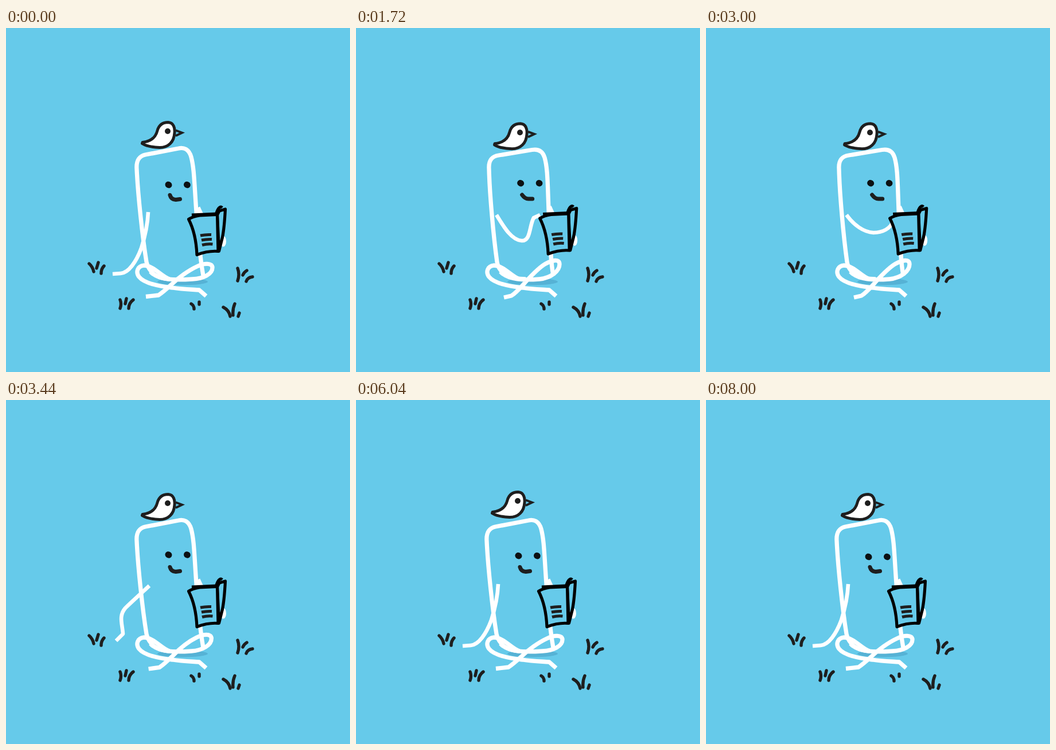
An HTML page that plays this animation: 600x600 px, repeating every 8.04 s.

```html
<!DOCTYPE html>
<html lang="en">
<head>
<meta charset="utf-8">
<title>Reading in the grass</title>
<style>
  html, body { margin: 0; width: 100%; height: 100%; overflow: hidden; background: #66caea; }
  svg { display: block; width: 100%; height: 100%; }
  path { fill: none; }
  .white { stroke: #fff; stroke-width: 7.3; stroke-linejoin: round; }
  .ink { stroke: #1e1e1e; stroke-width: 5; stroke-linecap: round; stroke-linejoin: round; }
  .book { stroke: #000; stroke-width: 5.2; stroke-linejoin: round; }
  .paper { fill: #66caea; }
</style>
</head>
<body>
<svg viewBox="0 0 600 600">
  <ellipse cx="308" cy="442.5" rx="44" ry="6" fill="#56b2d5"/>
  <path class="ink" style="stroke-width:5.4" d="M145,411 Q151,416 153,425 M161,409 L158,419 M171,415 Q166,420 166,428
    M199,474 Q202,481 199,489 M210,472 L208,481 M222,474 Q214,480 214,489
    M323,481 Q328,484 328,490 M337,478 L337,482
    M379,487 Q389,492 391,503 M399,481 Q395,490 396,501 M407,497 L405,503
    M404,419 Q408,430 404,441 M420,423 Q415,426 413,431 M430,434 Q421,435 419,442"/>

  <path id="body" class="white"/>
  <path class="white" d="M285,438 C272,434 258,415 241,414 C229,415 226,426 232,434 C240,444 262,450 290,453 C310,456 325,456 337,457 L349,467.5"/>
  <path id="leg" class="white"/>
  <path id="arm" class="white" style="stroke-width:6.6"/>

  <g id="book">
    <path class="white" d="M335,313 L341,326"/>
    <ellipse cx="379" cy="372" rx="5" ry="9.5" fill="#fff"/>
    <path class="book paper" d="M368.5,326 L372,319 L382.5,316 C381.5,335 380.5,350 377.5,365 L371.5,389 Z"/>
    <path class="book" d="M367,323 C370,313.5 374,310.5 377,313.5"/>
    <path class="book paper" d="M318.5,333.5 C324,330 330,328 338,327 L368.5,325.5 L370,389.5 C358,388.5 345,391 333,395.5 C332,372 327,350 318.5,333.5 Z"/>
    <path class="book" d="M324,326 L368,324"/>
    <path class="ink" style="stroke-linecap:butt" d="M339,362 Q348,360 358,360.5 M341,370 Q350,368 359,368.5 M342,378.5 Q351,376 360.5,377"/>
    <path id="page" class="book paper" d="M318.5,333.5 C324,330 330,328 338,327 L368.5,325.5 L370,389.5 C358,388.5 345,391 333,395.5 C332,372 327,350 318.5,333.5 Z"/>
  </g>

  <path id="eyes" d="M283,273.2 L284,273.8 M315.5,273.3 L316.3,273.7" stroke="#0c1012" stroke-width="11" stroke-linecap="round"/>
  <path id="smile" class="ink" style="stroke-width:7"/>

  <g id="bird">
    <path class="ink" style="fill:#fff" d="M238,199.5 C252,198 261,191 264,179 C267,168 275,164.5 283,164.5 C292,165 295,174 294,183 C293,199 283,208.5 268,208.5 C255,208 243,205 237.5,201.5 Z"/>
    <path d="M296,178.5 L307,182.7 L296,188" stroke="#1e1e1e" stroke-width="4"/>
    <circle cx="282" cy="180" r="5" fill="#1e1e1e"/>
  </g>
</svg>
<script>
const LOOP = 8040, STEP = 40;
const parts = {};
for (const id of ['body', 'leg', 'arm', 'book', 'page', 'eyes', 'smile', 'bird']) {
  parts[id] = document.getElementById(id);
}

const BODY = [
  'M344,432 C338,398 333,340 330,290 C328,258 327,240 323,225 C319,211 310,208 301,210 L243,221 C231,224 227,232 228,246 C230,290 238,365 245,408 C249,425 262,437 285,438',
  'M344,432 C338,398 337,340 335,290 C334,258 333,240 329,226 C325,213 316,211 307,212.5 L249,222 C236,224 231,232 232,246 C233,290 240,365 246,408 C249,428 268,438 296,438'
];
const LEG = [
  'M252,425 C265,440 295,440 325,438 C345,437 360,429 360,418 C360,409 345,410 333,416 C318,423 300,436 289,447 C278,457 272,462 266,466 L244,468.5',
  'M252,425 C265,440 295,440 320,438 C340,436 355,424 355,412 C355,402 342,405 331,411 C318,418 304,434 294,445 C284,456 279,462 271,467 L258,470'
];
const SMILE = [
  'M286,291.5 Q288,299 296,299.5 L303.5,298.5',
  'M286,290 Q291,297 297,297 L304,297'
];
const ARM = {
  rest: 'M248,321 C247,345 243,362 236,384 C227,408 214,427 200,428 L186,429',
  lift: 'M250,324 C236,337 219,352 208,363 C196,377 203,391 204,408 L192,420',
  reach: 'M245,326 C255,342 270,370 289,371 C305,372 302,345 310,331 L321,326',
  hold: 'M245,326 C258,344 275,356 292,357 C308,357 322,350 327,336 L328,333'
};
const ARM_KEYS = [
  [0, 'rest'], [1080, 'rest'], [1320, 'lift'], [1720, 'reach'], [2000, 'reach'],
  [2800, 'hold'], [3000, 'hold'], [3440, 'lift'], [3680, 'rest'], [LOOP, 'rest']
];

const ease = p => p * p * (3 - 2 * p);

// Finds the surrounding keys and the eased progress between them.
function span(keys, t) {
  let i = 1;
  while (i < keys.length - 1 && t > keys[i][0]) i++;
  const [t0, a] = keys[i - 1], [t1, b] = keys[i];
  return [a, b, ease((t - t0) / (t1 - t0))];
}

function value(t, ...keys) {
  const [a, b, p] = span(keys, t);
  return a + (b - a) * p;
}

// Blends two paths that share the same commands.
function blend(a, b, p) {
  const to = b.match(/[\d.]+/g);
  let i = 0;
  return a.replace(/[\d.]+/g, n => (+n + (to[i++] - n) * p).toFixed(2));
}

const move = (part, x, y) => part.setAttribute('transform', `translate(${x} ${y})`);

function draw(t) {
  const lean = value(t, [0, 0], [1080, 0], [1680, 1], [3040, 1], [3400, 0], [LOOP, 0]);
  const tuck = value(t, [0, 0], [40, 0], [840, .33], [1080, .33], [1680, 1],
    [3000, 1], [3400, .33], [3680, .33], [4400, 0], [LOOP, 0]);
  const grin = value(t, [0, 0], [40, 0], [840, 1], [3040, 1], [3400, 0], [LOOP, 0]);
  const gaze = value(t, [0, 0], [40, 0], [840, -3.5], [4680, -3.5], [5160, -2.7],
    [5360, -2.7], [6160, -1.7], [6200, -1.7], [6680, -.8], [6880, -.8], [7320, 0], [LOOP, 0]);
  const hop = value(t, [0, 0], [5360, 0], [5680, -6], [6040, -4], [6200, -4], [6640, 0], [LOOP, 0]);
  const flip = value(t, [0, 0], [2080, 0], [2720, 1], [LOOP, 1]);
  const [from, to, p] = span(ARM_KEYS, t);

  parts.body.setAttribute('d', blend(...BODY, lean));
  parts.leg.setAttribute('d', blend(...LEG, tuck));
  parts.smile.setAttribute('d', blend(...SMILE, grin));
  parts.arm.setAttribute('d', blend(ARM[from], ARM[to], p));
  move(parts.book, 2.2 * lean, -1.5 * lean);
  move(parts.eyes, 3.7 * lean, gaze + .7 * lean);
  move(parts.smile, 3.7 * lean, lean);
  move(parts.bird, 4 * lean, 2.3 * lean + hop);

  const turning = flip > 0 && flip < 1;
  parts.page.style.display = turning ? '' : 'none';
  parts.page.setAttribute('transform', `translate(369 0) scale(${Math.max(.03, 1 - flip)} 1) translate(-369 0)`);
}

const start = performance.now();
function tick() {
  const t = (performance.now() - start) % LOOP;
  draw(Math.floor(t / STEP) * STEP);
  requestAnimationFrame(tick);
}
tick();
</script>
</body>
</html>
```
